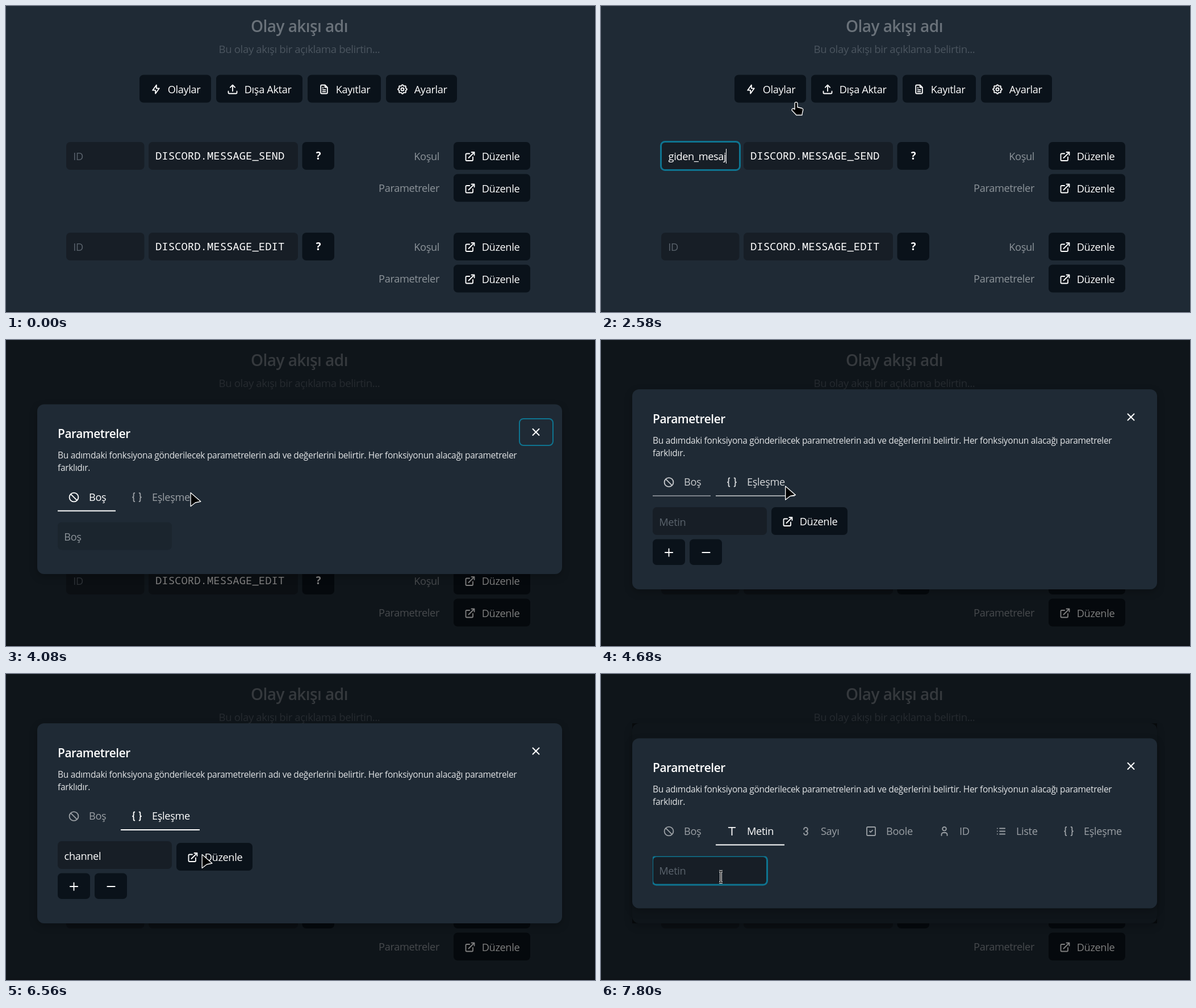
Recreate the animation shown at these times as an HTML page. Size 1037 px wide and 540 px high, loop 8 s.

```html
<!DOCTYPE html>
<html lang="tr">
<head>
<meta charset="utf-8">
<title>Olay akışı</title>
<style>
html, body { margin: 0; width: 100%; height: 100%; overflow: hidden; background: #1f2a35; }
svg { display: block; width: 100%; height: 100%; color: #fff; }
text { font: 400 18.2px "Open Sans", "Noto Sans", sans-serif; letter-spacing: -.02em; fill: currentColor; }
.title { font-size: 28px; font-weight: 600; fill: #6a727a; text-anchor: middle; }
.sub { font-size: 18.6px; fill: #4b555f; text-anchor: middle; }
.label { fill: #8d949a; text-anchor: end; }
.hint { fill: #5a636c; }
.empty { fill: #8d949a; }
.mono { font: 500 18.95px "Noto Sans Mono", "DejaVu Sans Mono", monospace; letter-spacing: 0; }
.mid { font-weight: 700; text-anchor: middle; }
.head { font-size: 20.8px; font-weight: 600; }
.desc { font-size: 15.53px; fill: #e2e4e6; }
.icon { fill: none; stroke: currentColor; stroke-width: 2.2; stroke-linecap: round; stroke-linejoin: round; }
.ring { fill: none; stroke: #0e7490; stroke-width: 2; }
.ring.thick { stroke-width: 3; }
.sheet { filter: drop-shadow(0 5px 7px rgba(0, 0, 0, .22)); }
.cursor { fill: #000; stroke: #fff; stroke-width: 1.3; stroke-linejoin: round; }
.beam path { fill: none; }
.beam path + path { stroke: #000; stroke-width: 1.4; }
.beam path:first-child { stroke-width: 3.6; }
</style>
</head>
<body>
<svg id="stage" viewBox="0 0 1037 540"></svg>
<script>
const LOOP = 8000;
const DARK = '#0a121a', FIELD = '#171e26', EDGE = '#18212a';

const gear = 'M' + Array.from({ length: 65 }, (_, i) => {
  const a = i * Math.PI / 32, r = 8.4 + 1.1 * Math.cos(8 * a);
  return (12 + r * Math.cos(a)).toFixed(2) + ' ' + (12 + r * Math.sin(a)).toFixed(2);
}).join('L') + 'zM9 12a3 3 0 1 0 6 0a3 3 0 1 0-6 0';

const ICONS = {
  bolt: 'M13 3v7h6l-8 11v-7H5z',
  upload: 'M3 16v3a2 2 0 0 0 2 2h14a2 2 0 0 0 2-2v-3M7 8l5-5 5 5M12 3v13',
  file: 'M14 3v5h5M17 21H7a2 2 0 0 1-2-2V5a2 2 0 0 1 2-2h7l5 5v11a2 2 0 0 1-2 2zM9 9h1M9 13h6M9 17h6',
  gear,
  open: 'M11 6H5a2 2 0 0 0-2 2v11a2 2 0 0 0 2 2h11a2 2 0 0 0 2-2v-6M9 15 21 3M15 3h6v6',
  ban: 'M2.5 12a9.5 9.5 0 1 0 19 0a9.5 9.5 0 1 0-19 0M5.5 5.5l13 13',
  braces: 'M7 3a2 2 0 0 0-2 2v4a2 3 0 0 1-2 3a2 3 0 0 1 2 3v4a2 2 0 0 0 2 2M17 3a2 2 0 0 1 2 2v4a2 3 0 0 0 2 3a2 3 0 0 0-2 3v4a2 2 0 0 1-2 2',
  type: 'M5 4h14M12 4v16',
  three: 'M8 8a4 4 0 1 1 4 4a4 4 0 1 1-4 4',
  check: 'M5 3h14a2 2 0 0 1 2 2v14a2 2 0 0 1-2 2H5a2 2 0 0 1-2-2V5a2 2 0 0 1 2-2zM9 12l2 2 4-4',
  user: 'M8 7a4 4 0 1 0 8 0a4 4 0 1 0-8 0M6 21v-2a4 4 0 0 1 4-4h4a4 4 0 0 1 4 4v2',
  list: 'M9 6h11M9 12h11M9 18h11M4 6v.01M4 12v.01M4 18v.01',
  close: 'M18 6 6 18M6 6l12 12',
  plus: 'M12 4v16M4 12h16',
  minus: 'M4 12h16'
};

// Markup helpers
const rect = (x, y, w, h, fill, r = 7, attrs = '') =>
  `<rect x="${x}" y="${y}" width="${w}" height="${h}" rx="${r}" fill="${fill}" ${attrs}/>`;
const text = (x, y, s, cls = '', attrs = '') => `<text x="${x}" y="${y}" class="${cls}" ${attrs}>${s}</text>`;
const icon = (name, x, y, size = 20) =>
  `<path class="icon" d="${ICONS[name]}" transform="translate(${x - size / 2} ${y - size / 2}) scale(${size / 24})"/>`;
const ring = (id, x, y, w, h, cls = '') =>
  `<rect id="${id}" class="ring ${cls}" x="${x}" y="${y}" width="${w}" height="${h}" rx="7"/>`;
const group = (id, body, attrs = '') => `<g id="${id}" ${attrs}>${body}</g>`;
const button = (x, y, w, label, name, h = 49) =>
  rect(x, y, w, h, DARK) + icon(name, x + 29, y + 25.5) + text(x + 49.7, y + 32.4, label);
const caret = (id, x, y) => rect(x, y, 1, 26, '#fff', 0, `id="${id}"`);

function step(y, name, first) {
  const id = first ? text(118.6, y + 32, '', '', 'id="idText"') : '';
  return rect(106, y, 137.5, 49, FIELD) + text(118.3, y + 32, 'ID', 'hint', first ? 'id="idHint"' : '') + id +
    rect(251, y, 263, 49, FIELD) + text(263, y + 31, name, 'mono') +
    rect(521.5, y, 56.5, 49, DARK) + text(550, y + 31, '?', 'mono mid') +
    text(763, y + 32, 'Koşul', 'label') + button(788, y, 135, 'Düzenle', 'open') +
    text(763, y + 88, 'Parametreler', 'label') +
    group(first ? 'edit' : 'edit2', button(788, y + 56.5, 135, 'Düzenle', 'open'));
}

const tab = (id, x, w, name, label) => group(id,
  icon(name, x + 28.5, 164) + text(x + 55, 170.4, label) + rect(x, 187, w, 2, '#fff', 0));

function modal(id, top, height, tabs, panel) {
  return group(id,
    rect(55, 0, 924, height, '#1f2a35', 12, 'class="sheet"') +
    text(91, 59.6, 'Parametreler', 'head') +
    text(91, 95.5, 'Bu adımdaki fonksiyona gönderilecek parametrelerin adı ve değerlerini belirtir. Her fonksiyonun alacağı parametreler', 'desc') +
    text(91, 117.5, 'farklıdır.', 'desc') +
    icon('close', 933, 49, 22) + ring(id + 'Ring', 904, 25.5, 59, 47) +
    tabs.map(([x, w, name, label], i) => tab(`${id}Tab${i}`, x, w, name, label)).join('') +
    `<g clip-path="url(#panel)">${panel}</g>`,
    `transform="translate(0 ${top})"`);
}

const emptyPanel = id => group(id, rect(91, 208, 201, 49, '#1b252e') + text(102.3, 240.5, 'Boş', 'empty'));
const textPanel = id => group(id,
  rect(91, 208, 201, 49, FIELD) + text(102.3, 240.5, 'Metin', 'hint', `id="${id}Hint"`) +
  text(102.6, 240.5, '', '', `id="${id}Text"`) + ring(id + 'Ring', 90.5, 208, 202, 50.5, 'thick') +
  caret(id + 'Caret', 102, 220));

const BAN = [91, 102, 'ban', 'Boş'];
const stage = document.getElementById('stage');
stage.innerHTML =
  '<clipPath id="panel"><rect x="91" y="208" width="860" height="140"/></clipPath>' +
  rect(0, 0, 1037, 540, '#1f2a35', 0) + rect(0, 538, 1037, 2, EDGE, 0) + rect(1036, 0, 1, 540, EDGE, 0) +
  text(516.5, 45.5, 'Olay akışı adı', 'title') +
  text(516.5, 83, 'Bu olay akışı bir açıklama belirtin...', 'sub') +
  button(235, 121.5, 126, 'Olaylar', 'bolt') + button(370, 121.5, 152, 'Dışa Aktar', 'upload') +
  button(531, 121.5, 129, 'Kayıtlar', 'file') + button(669, 121.5, 125, 'Ayarlar', 'gear') +
  step(240, 'DISCORD.MESSAGE_SEND', true) + step(400, 'DISCORD.MESSAGE_EDIT') +
  ring('idRing', 105.5, 239.5, 139, 50, 'thick') + caret('idCaret', 118, 252) +
  group('editDown', rect(788, 299, 135, 49, '#04080c') + icon('open', 817, 325) + text(837.7, 331.6, 'Düzenle') +
    ring('editRing', 787, 298, 137, 50.5)) +
  rect(0, 0, 1037, 540, '#000', 0, 'id="shade"') +
  modal('first', 113.5, 299.5, [BAN, [202, 139, 'braces', 'Eşleşme']], emptyPanel('none')) +
  modal('match', 87, 353, [BAN, [202, 139, 'braces', 'Eşleşme']],
    textPanel('key') + group('value', button(300, 208, 134, 'Düzenle', 'open')) +
    rect(91, 264.5, 57, 45.5, DARK) + icon('plus', 119.5, 288) +
    rect(156, 264.5, 57, 45.5, DARK) + icon('minus', 185, 288)) +
  rect(55, 87, 924, 353, '#000', 0, 'id="shade2"') +
  modal('inner', 113.5, 300, [BAN, [202, 121, 'type', 'Metin'], [332, 107, 'three', 'Sayı'],
    [447, 121, 'check', 'Boole'], [576, 92, 'user', 'ID'], [676, 110, 'list', 'Liste'],
    [795, 139, 'braces', 'Eşleşme']], emptyPanel('blank') + textPanel('val')) +
  group('arrow', '<path d="M.7 1V25L9 18.5L18.5 16.5z"/>', 'class="cursor"') +
  group('hand', '<path d="M-4 2.5a2.4 2.4 0 0 1 4.8 0v6.5l8 2q2 .6 1.8 3l-1.2 5q-.4 1.500-.5 4h-10l-8-8.500a2.500 2.500 0 0 1 4.100-2.500l1 1z"/>'.replace(/00\b/g, ''), 'class="cursor"') +
  group('beam', '<path d="BEAM"/><path d="BEAM"/>'.replaceAll('BEAM', 'M-3-10h2l1 1 1-1h2M0-9V9M-3 10h2l1-1 1 1h2'), 'class="cursor beam"');

const el = Object.fromEntries([...stage.querySelectorAll('[id]')].map(n => [n.id, n]));
const show = (id, on) => { el[id].style.display = on ? '' : 'none'; };
const ramp = (t, a, b) => Math.min(1, Math.max(0, (t - a) / (b - a)));
const easeOut = p => 1 - (1 - p) ** 2;

// Pointer strokes as [time, x, y]; it rests at both ends of each stroke
const STROKES = [
  [[40, 637, 540], [260, 520, 400], [400, 300, 280], [540, 181, 264]],
  [[2380, 181, 264], [2580, 344, 170], [2700, 520, 112], [2880, 748, 94]],
  [[3020, 748, 94], [3240, 845, 190], [3480, 828, 315]],
  [[3840, 828, 315], [3940, 640, 392], [4080, 326.5, 269], [4180, 128, 262], [4320, 324, 257]],
  [[4980, 324, 257], [5120, 256, 298], [5240, 211, 324]],
  [[6140, 211, 324], [6300, 290, 328], [6460, 344.5, 317.5]],
  [[6960, 344.5, 317.5], [7120, 262, 272]],
  [[7300, 262, 272], [7590, 211, 358]]
];

function pointer(t) {
  const stroke = STROKES.findLast(s => s[0][0] <= t);
  if (!stroke) return null;
  const last = stroke.length - 1;
  if (t >= stroke[last][0]) return stroke[last].slice(1);
  const i = stroke.findLastIndex(p => p[0] <= t);
  const a = stroke[i], b = stroke[i + 1], span = b[0] - a[0], u = (t - a[0]) / span;
  const slope = (k, c) => k === 0 || k === last ? 0 :
    (stroke[k + 1][c] - stroke[k - 1][c]) / (stroke[k + 1][0] - stroke[k - 1][0]) * span;
  const at = c => (1 + 2 * u) * (1 - u) ** 2 * a[c] + u * (1 - u) ** 2 * slope(i, c) +
    u * u * (3 - 2 * u) * b[c] + u * u * (u - 1) * slope(i + 1, c);
  return [at(1), at(2)];
}

function pointerKind(t, x, y) {
  const within = (l, top, r, bottom) => x >= l && x <= r && y >= top && y <= bottom;
  if (t < 3640) {
    if (within(106, 240, 243, 289) || within(251, 240, 514, 289)) return 'beam';
    const nav = [[235, 361], [370, 522], [531, 660], [669, 794]];
    return nav.some(([l, r]) => within(l, 121, r, 171)) ? 'hand' : 'arrow';
  }
  if (t >= 4600 && t < 6640 && within(91, 295, 292, 345)) return 'beam';
  return t >= 7140 && within(91, 321, 292, 371) ? 'beam' : 'arrow';
}

function field(t, name, value, keys, focus, blur, x) {
  const n = keys.filter(k => k <= t).length;
  const focused = t >= focus && t < blur;
  const since = t - (n ? keys[n - 1] : focus);
  const node = el[name + 'Text'];
  if (node.textContent.length !== n) node.textContent = value.slice(0, n);
  show(name + 'Hint', !n);
  show(name + 'Ring', focused);
  show(name + 'Caret', focused && Math.floor(since / 250) % 2 === 0);
  el[name + 'Caret'].setAttribute('x', Math.round(x + (n ? node.getComputedTextLength() + .6 : 0)));
}

function tabs(id, count, active, p) {
  for (let i = 0; i < count; i++) {
    const on = i === active ? p : i === 0 ? 1 - p : 0;
    const node = el[`${id}Tab${i}`];
    for (const part of node.children) part.style.opacity = .55 + .45 * on;
    node.lastChild.style.opacity = on;
  }
}

const ID_KEYS = [980, 1060, 1140, 1220, 1300, 1440, 1680, 1780, 1880, 1980, 2080];
const NAME_KEYS = [5560, 5630, 5700, 5780, 5850, 5920, 6000];

function draw(t) {
  show('first', t >= 3640 && t < 4600);
  show('match', t >= 4600);
  show('inner', t >= 6640);
  const open = easeOut(ramp(t, 3640, 3820)), open2 = easeOut(ramp(t, 6640, 6860));
  el.shade.style.opacity = open / 2;
  el.first.style.opacity = open;
  el.shade2.style.opacity = open2 / 2;
  el.inner.style.opacity = open2;

  field(t, 'id', 'giden_mesaj', ID_KEYS, 550, 3540, 118);
  field(t, 'key', 'channel', NAME_KEYS, 5250, 6520, 102);
  field(t, 'val', '', [], 7550, LOOP, 102);

  const down = t >= 3540 && t < 3660;
  show('edit', !down);
  show('editDown', down);
  el.value.setAttribute('transform', `translate(0 ${t >= 6520 && t < 6640 ? 3 : 0})`);

  tabs('first', 2, 1, 0);
  tabs('match', 2, 1, ramp(t, 4600, 4740));
  tabs('inner', 7, 1, ramp(t, 7140, 7280));
  show('matchRing', false);
  el.innerRing.style.opacity = 1 - ramp(t, 7140, 7280);
  show('blank', t < 7140);
  show('val', t >= 7140);

  const p = pointer(t), kind = p && pointerKind(t, ...p);
  for (const k of ['arrow', 'hand', 'beam']) show(k, k === kind);
  if (p) el[kind].setAttribute('transform', `translate(${p[0].toFixed(1)} ${p[1].toFixed(1)})`);
}

const start = performance.now();
function tick() {
  draw((performance.now() - start) % LOOP);
  requestAnimationFrame(tick);
}
tick();
</script>
</body>
</html>
```
